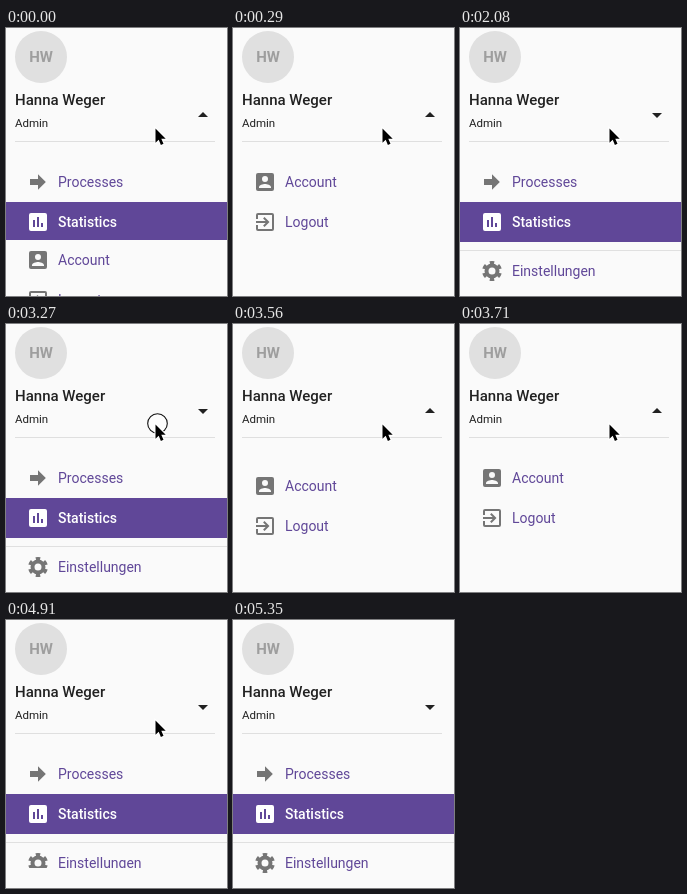
Write an HTML page that moves like this. It is 221 px wide and 268 px high and loops after 6540 ms.

```html
<!DOCTYPE html>
<html lang="en">
<head>
<meta charset="utf-8">
<title>Account menu</title>
<style>
  :root { --purple: #604798; --loop: 6540ms step-end infinite; }
  html, body { margin: 0; width: 100%; height: 100%; overflow: hidden; }
  body { position: relative; background: #fafafa; font: 14px Roboto, sans-serif; }
  .layer { position: absolute; left: 0; top: 0; width: 221px; height: 268px; }

  .menu { position: absolute; left: 0; top: 134px; width: 221px; height: 134px; overflow: hidden; }
  .group { overflow: hidden; }
  .main { height: 134px; animation: main var(--loop); }
  .user { height: 80px; animation: user var(--loop); }
  .item { display: flex; align-items: center; height: 40px; line-height: 40px; padding-left: 20px; color: var(--purple); white-space: nowrap; }
  .item svg { width: 24px; height: 24px; margin-right: 8px; flex: none; color: #757575; fill: currentColor; }
  .active { background: var(--purple); color: #fff; font-weight: 500; }
  .active svg { color: #fff; }
  .rule { height: 1px; margin-top: 8px; background: #e0e0e0; }

  .caret { animation: caret var(--loop); }
  .ring { visibility: hidden; animation: ring var(--loop); }
  .arrow { animation: arrow var(--loop); }
  .hand { visibility: hidden; animation: hand var(--loop); }

  /* Main links collapse and expand, pushing the user links up and down */
  @keyframes main {
    0% { height: 78px }
    2.14% { height: 5px }
    4.434% { height: 0 }
    29.51% { height: 51px }
    31.804% { height: 134px }
    52.293% { height: 92px }
    54.434% { height: 8px }
    56.727% { height: 0 }
    72.782% { height: 1px }
    75.076% { height: 114px }
    77.37%, 100% { height: 134px }
  }
  @keyframes user {
    0% { height: 80px; font-weight: 400 }
    29.51% { height: 40px; font-weight: 400 }
    31.804% { height: 0; font-weight: 400 }
    52.293% { height: 80px; font-weight: 400 }
    72.782% { height: 80px; font-weight: 500 }
    75.076%, 100% { height: 0; font-weight: 400 }
  }
  @keyframes caret {
    0%, 52.293% { transform: none }
    29.51%, 72.782%, 100% { transform: translateY(174px) scaleY(-1) }
  }
  @keyframes ring {
    0%, 29.51%, 52.293%, 75.076%, 100% { visibility: hidden }
    27.217%, 50%, 72.782% { visibility: visible }
  }
  @keyframes arrow {
    0% { visibility: visible }
    79.663%, 100% { visibility: hidden }
  }
  @keyframes hand {
    0%, 81.804%, 100% { visibility: hidden }
    79.663% { visibility: visible }
  }
</style>
</head>
<body>
<svg width="0" height="0" style="position:absolute">
  <symbol id="forward" viewBox="0 0 24 24"><path d="M4 15V9h8V4.16L19.84 12 12 19.84V15z"/></symbol>
  <symbol id="chart" viewBox="0 0 24 24">
    <path fill-rule="evenodd" d="M5 3h14a2 2 0 0 1 2 2v14a2 2 0 0 1-2 2H5a2 2 0 0 1-2-2V5a2 2 0 0 1 2-2zM7 10v7h2v-7zM11 7v10h2V7zM15 13v4h2v-4z"/>
  </symbol>
  <symbol id="gear" viewBox="0 0 24 24">
    <g fill="none" stroke="currentColor">
      <circle cx="12" cy="12" r="5.5" stroke-width="4"/>
      <circle cx="12" cy="12" r="8.4" stroke-width="3.2" pathLength="6" stroke-dasharray=".5 .5" stroke-dashoffset="-.25"/>
    </g>
  </symbol>
  <symbol id="person" viewBox="0 0 24 24">
    <path fill-rule="evenodd" d="M5 3h14a2 2 0 0 1 2 2v14a2 2 0 0 1-2 2H5a2 2 0 0 1-2-2V5a2 2 0 0 1 2-2zM15 9a3 3 0 1 0-6 0a3 3 0 0 0 6 0zM6 17v1h12v-1c0-2-4-3.1-6-3.1S6 15 6 17z"/>
  </symbol>
  <symbol id="exit" viewBox="0 0 24 24">
    <path d="M10.09 15.59L11.5 17l5-5-5-5-1.41 1.41L12.67 11H3v2h9.67zM19 3H5a2 2 0 0 0-2 2v4h2V5h14v14H5v-4H3v4a2 2 0 0 0 2 2h14a2 2 0 0 0 2-2V5a2 2 0 0 0-2-2z"/>
  </symbol>
</svg>

<svg class="layer" viewBox="0 0 221 268">
  <circle cx="35" cy="29" r="26" fill="#e0e0e0"/>
  <text x="35" y="34" text-anchor="middle" font-size="15" font-weight="700" fill="#9e9e9e">HW</text>
  <text x="9" y="77" font-size="15" font-weight="500" fill="#212121">Hanna Weger</text>
  <text x="9" y="99" font-size="11.5" fill="#212121">Admin</text>
  <path class="caret" d="M192 89h10l-5-5z" fill="#212121"/>
  <path d="M9 113h200v1H9z" fill="#dfdfdf"/>
</svg>

<div class="menu">
  <div class="group main">
    <div class="item"><svg><use href="#forward"/></svg>Processes</div>
    <div class="item active"><svg><use href="#chart"/></svg>Statistics</div>
    <div class="rule"></div>
    <div class="item"><svg><use href="#gear"/></svg>Einstellungen</div>
  </div>
  <div class="group user">
    <div class="item"><svg><use href="#person"/></svg>Account</div>
    <div class="item"><svg><use href="#exit"/></svg>Logout</div>
  </div>
</div>

<svg class="layer" viewBox="0 0 221 268">
  <circle class="ring" cx="151.5" cy="99.5" r="9.8" fill="#fff" fill-opacity=".5" stroke="#111" stroke-width="1.1"/>
  <path class="arrow" transform="translate(149.5 100.5)" d="M0 0V14.3L3.2 11.3 5.4 16.4 8 15.3 5.8 10.3H10.2Z" fill="#000" stroke="#fff" stroke-width="2" paint-order="stroke"/>
  <path class="hand" transform="translate(153 154)" d="M5.5 11.5V2.5a1.4 1.4 0 0 1 2.8 0V7a1.3 1.3 0 0 1 2.5 0a1.2 1.2 0 0 1 2.4.6a1.1 1.1 0 0 1 2.2.6V12c0 2-1.4 3-1.4 5H6.5C6 14.5 3 12.5 1.5 10.4c-.7-1.3.7-2.2 1.8-1.2z" fill="#fff" stroke="#000" stroke-linejoin="round"/>
</svg>
</body>
</html>
```
